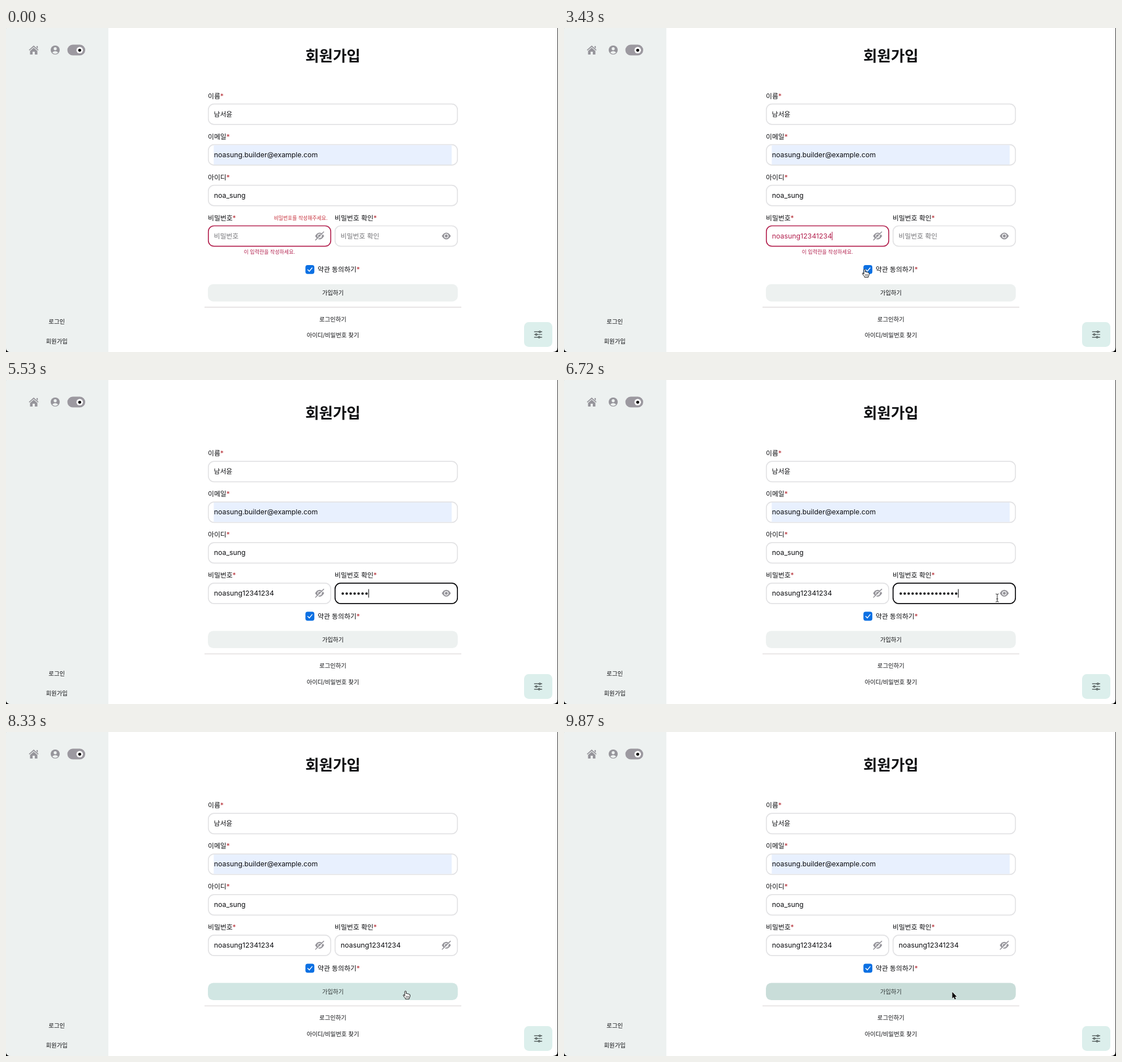
Animation of 976 by 574 pixels, one loop 9.94 s. Source, as an HTML page:

```html
<!DOCTYPE html>
<html lang="ko">
<head>
<meta charset="utf-8">
<title>회원가입</title>
<style>
  html, body { margin: 0; width: 100%; height: 100%; overflow: hidden; background: #000; }
  svg { display: block; width: 976px; height: 574px; font-family: Inter, "Noto Sans CJK KR", "Noto Sans CJK", "Noto Sans", sans-serif; }
  text { fill: #0c0d10; }
  .hint { fill: #757579; }
  .box { fill: #fff; stroke: #e2e2e4; stroke-width: 1.7; }
  .star { fill: #b3262e; }
  .mid { text-anchor: middle; }
  .end { text-anchor: end; }
  .bold { font-weight: 700; }
  .med { font-weight: 500; }
  .icon { fill: #96959b; }
</style>
</head>
<body>
<svg id="stage" viewBox="0 0 976 574"></svg>
<script>
const LOOP = 9940, STEP = 70;
const PASSWORD = 'noasung12341234';
const RED = '#b3224f', GREY = '#e2e2e4';
const LABEL = 11.85, VALUE = 12.3;

// Times at which each character lands in the two password fields.
const typedLeft = [910, 1050, 1260, 1540, 1610, 1750, 1820, 2170, 2310, 2450, 2730, 2800, 2870, 2940, 3080];
const typedRight = [4200, 4340, 4480, 5040, 5180, 5320, 5530, 5810, 5880, 5950, 6020, 6090, 6160, 6230, 6300];

const FOCUS_LEFT = 560, FOCUS_RIGHT = 3710, SETTLE = 3780, REVEAL = 6860;

// Pointer path: time, x, y, shape used from that time on.
const path = [
  [70, 966, 536, 'arrow'], [210, 800, 455, 'arrow'], [350, 545, 346, 'arrow'], [420, 506, 354, 'beam'],
  [560, 472, 366, 'beam'], [910, 472, 366, ''],
  [3220, 480, 378, 'beam'], [3290, 496, 402, 'arrow'], [3360, 522, 424, 'hand'], [3430, 531.5, 427.5, 'hand'],
  [3500, 548, 420, 'hand'], [3570, 580, 398, 'arrow'], [3640, 616, 374, 'beam'], [3710, 629, 367, 'beam'],
  [4200, 629, 367, ''],
  [6440, 629, 370, 'beam'], [6580, 690, 402, 'arrow'], [6720, 766, 386, 'beam'], [6790, 778, 375, 'hand'],
  [6930, 780, 374, 'hand'], [7070, 789, 378, 'hand'], [7210, 780, 362, 'hand'], [7560, 780, 362, 'hand'],
  [7630, 734.5, 410.5, 'arrow'], [7980, 722, 446, 'hand'], [8260, 708, 460, 'hand'], [8470, 703, 457, 'hand'],
  [8540, 702, 448, 'hand'], [8610, 702, 430, 'arrow'], [8680, 701, 416, 'arrow'], [8750, 699, 434, 'arrow'],
  [8820, 696, 445, 'hand'], [8890, 693, 450, 'hand'], [9240, 698, 464, 'hand'], [9450, 692, 470, 'hand'],
  [9540, 689, 468, 'arrow'], [9660, 687.5, 463, 'arrow'], [9870, 686.5, 460.5, 'arrow']
];

// Submit button tone: 0 idle, 1 hovered, 2 sent.
const tone = [[0, 0], [7950, 0], [8120, 1], [8560, 1], [8680, 0.4], [8800, 0.4], [8880, 1], [9540, 1], [9800, 2]];
const toneColors = [[237, 241, 240], [209, 230, 227], [201, 221, 217]];

const text = (x, cy, size, str, cls = '', id = '') =>
  `<text id="${id}" class="${cls}" x="${x}" y="${cy + size * 0.38}" font-size="${size}">${str}</text>`;
const label = (x, cy, str) => text(x, cy, LABEL, str + '<tspan class="star">*</tspan>');
const box = (x, y, w, id = '') =>
  `<rect id="${id}" class="box" x="${x}" y="${y}" width="${w}" height="36.2" rx="10"/>`;
const eye = (x, id, slash) => `<g id="${id}" class="icon" transform="translate(${x} 368.4)">
  <path d="M-8 0Q-4.5-6 0-6T8 0Q4.5 6 0 6T-8 0Z"/>
  <circle r="3.2" fill="none" stroke="#fff" stroke-width="1.3"/>
  ${slash ? '<path d="M-6.5 8.4 8.1-6.2" stroke="#fff" stroke-width="1.6"/><path d="M-7.2 7.2 7.2-7.2" stroke="#96959b" stroke-width="1.6" stroke-linecap="round"/>' : ''}</g>`;

document.getElementById('stage').innerHTML = `
  <path d="M0 1Q0 0 1 0H975.2V566Q975.2 574 967 574H8Q0 574 0 566Z" fill="#fff"/>
  <path d="M0 1Q0 0 1 0H181V574H8Q0 574 0 566Z" fill="#edf1f0"/>
  <path class="icon" fill-rule="evenodd" d="M49 31 57.6 38.8 56.5 40.1 49 33.4 41.5 40.1 40.4 38.8ZM54 32H56.2V36.6L54 34.6ZM49 35 55.5 40.8V47H51V42H47V47H42.5V40.8Z"/>
  <circle class="icon" cx="87" cy="39" r="8"/>
  <circle cx="87" cy="36.7" r="2.7" fill="#edf1f0"/>
  <path d="M81.8 43.3Q87 38.8 92.2 43.3Q90 46 87 46T81.8 43.3Z" fill="#edf1f0"/>
  <rect x="108.5" y="29.6" width="31.6" height="19" rx="9.5" fill="#9c99a0"/>
  <circle cx="130.3" cy="39.3" r="5.8" fill="#fff"/><circle cx="130.3" cy="39.3" r="2.6"/>
  ${text(89.7, 520.5, 10.4, '로그인', 'mid med')}
  ${text(89.7, 555, 10.4, '회원가입', 'mid med')}
  <rect x="916" y="521" width="50" height="44" rx="8.5" fill="#dcefec"/>
  <g stroke="#3c4544" stroke-width="1.2" fill="#dcefec">
    <path d="M933.8 538.2H948M933.8 543H948M933.8 547.8H948"/>
    <circle cx="943.8" cy="538.2" r="1.4"/><circle cx="937.6" cy="543" r="1.4"/><circle cx="942.6" cy="547.8" r="1.4"/>
  </g>
  <g id="upper">
    ${text(578, 49, 26.5, '회원가입', 'mid bold')}
    ${label(357, 120.5, '이름')}${box(357.8, 134.7, 440.4)}${text(367.5, 152, LABEL, '남서윤')}
    ${label(357, 192.5, '이메일')}${box(357.8, 206.7, 440.4)}
    <rect x="367.3" y="207.6" width="420.7" height="34.4" fill="#e8f0fe"/>
    ${text(367.8, 224.4, VALUE, 'noasung.builder@example.com')}
    ${label(357, 264.5, '아이디')}${box(357.8, 278.7, 440.4)}${text(367.8, 296.4, VALUE, 'noa_sung')}
    ${label(357, 336.5, '비밀번호')}${label(581, 336.5, '비밀번호 확인')}
    ${text(568.5, 336.7, 8.9, '', 'end', 'warn')}
    ${box(357.8, 350.5, 216.4, 'boxL')}${box(581.8, 350.5, 216.4, 'boxR')}
    ${text(367.5, 368, LABEL, '비밀번호', 'hint', 'hintL')}
    ${text(591.5, 368, LABEL, '비밀번호 확인', 'hint', 'hintR')}
    ${text(367.8, 368.2, VALUE, '', '', 'textL')}
    ${text(591.8, 368.2, VALUE, PASSWORD, '', 'textR')}
    <path id="dots" fill="none" stroke="#0c0d10" stroke-width="4.3" stroke-linecap="round"/>
    <path id="caret" d="M0 361V376" stroke-width="1.1"/>
    ${eye(554.5, 'eyeL', true)}${eye(778.5, 'eyeOpen', false)}${eye(778.5, 'eyeShut', true)}
  </g>
  ${text(465.8, 396.2, 9, '이 입력란을 작성하세요.', 'mid', 'required')}
  <g id="lower">
    <rect x="529.4" y="420" width="15.8" height="15.8" rx="4" fill="#0b70e3"/>
    <path d="M533.6 428.2 536.3 431 541.2 425" fill="none" stroke="#fff" stroke-width="1.5" stroke-linecap="round" stroke-linejoin="round"/>
    ${label(551, 427.6, '약관 동의하기')}
    <rect id="submit" x="357" y="453.8" width="441.8" height="30.6" rx="9.5"/>
    ${text(578, 469, 10.3, '가입하기', 'mid med', 'submitText')}
    <path d="M351 494.6H805" stroke="#e3dfe0" stroke-width="1.6"/>
    ${text(578, 515.6, 10.4, '로그인하기', 'mid')}
    ${text(578, 544, 10.4, '아이디/비밀번호 찾기', 'mid')}
  </g>
  <g id="pointer" stroke-linejoin="round" stroke-linecap="round">
    <path id="arrow" d="M0 0V11.4L2.6 9.1 4.4 13.2 6.4 12.3 4.7 8.4H8Z" stroke="#fff" stroke-width="1.1" paint-order="stroke"/>
    <g id="hand" fill="#fff" stroke="#111" stroke-width="1">
      <path d="M-1.3 8.2V1Q-1.2-.1 0-.1T1.3 1V4.6Q2.6 3.7 3.6 5Q5 4.2 5.8 5.6Q7.8 5.1 8 7V9.3Q7.8 11 6.6 12.4V14H-.2V12.7Q-2.2 10.9-3.9 7.9Q-4.2 6.5-2.9 6.4Z"/>
      <path d="M1.4 8.8V11.6M3.4 8.8V11.6M5.4 8.8V11.6" stroke-width=".7"/>
    </g>
    <path id="beam" d="M-2.3-7Q0-7 0-5.8Q0-7 2.3-7M0-5.8V5.8M-2.3 7Q0 7 0 5.8Q0 7 2.3 7M-1.2 1.8H1.2" fill="none" stroke="#222" stroke-width="1"/>
  </g>`;

const $ = id => document.getElementById(id);
const set = (id, attr, value) => $(id).setAttribute(attr, value);
const show = (id, on) => set(id, 'visibility', on ? 'visible' : 'hidden');
const paint = (id, prop, value) => { $(id).style[prop] = value; };
const mix = (a, b, k) => a + (b - a) * k;
const count = (times, t) => times.filter(at => t >= at).length;
const ramp = (t, from, ms) => Math.min(1, Math.max(0, (t - from) / ms));
const rgb = (a, b, k) => `rgb(${a.map((v, i) => Math.round(mix(v, b[i], k)))})`;

// Rows around t and the fraction between them.
function span(rows, t) {
  const i = rows.findLastIndex(row => t >= row[0]);
  const a = rows[Math.max(i, 0)], b = rows[Math.min(i + 1, rows.length - 1)];
  return { i, a, b, k: b[0] > a[0] ? ramp(t, a[0], b[0] - a[0]) : 0 };
}

function drawFields(t) {
  const nL = count(typedLeft, t), nR = count(typedRight, t);
  const settled = t >= SETTLE, revealed = t >= REVEAL;
  const onRight = t >= FOCUS_RIGHT && !revealed;
  const onLeft = t >= FOCUS_LEFT && t < FOCUS_RIGHT;

  set('upper', 'transform', `translate(0 ${settled ? 9.4 : 0})`);
  set('lower', 'transform', `translate(0 ${settled ? -9.4 : 0})`);
  show('required', !settled);
  paint('required', 'fill', RED);

  $('warn').textContent = nL === 0 ? '비밀번호를 작성해주세요.' : nL < 12 ? '12글자 이상으로 작성해주세요.' : '';
  paint('warn', 'fill', '#c62f3a');

  show('hintL', nL === 0);
  $('textL').textContent = PASSWORD.slice(0, nL);
  paint('textL', 'fill', settled ? '#0c0d10' : RED);
  paint('boxL', 'stroke', settled ? rgb([179, 34, 79], [226, 226, 228], ramp(t, SETTLE - 70, 210)) : RED);

  show('hintR', nR === 0);
  show('textR', revealed);
  show('dots', nR > 0 && !revealed);
  set('dots', 'd', Array.from({ length: nR }, (_, i) => `M${595.4 + 7 * i} 369h.01`).join('') || 'M0 0');
  const focus = revealed ? 1 - ramp(t, REVEAL - 70, 210) : ramp(t, FOCUS_RIGHT - 70, 140);
  paint('boxR', 'stroke', rgb([226, 226, 228], [5, 5, 8], focus));
  show('eyeOpen', !revealed);
  show('eyeShut', revealed);

  show('caret', onLeft || onRight);
  const x = onRight ? 592.2 + 7 * nR : 368 + (nL ? $('textL').getComputedTextLength() : 0);
  set('caret', 'transform', `translate(${x} 0)`);
  set('caret', 'stroke', onRight ? '#0c0d10' : RED);
}

function drawSubmit(t) {
  const { a, b, k } = span(tone, t);
  const level = mix(a[1], b[1], k), base = Math.min(1, Math.floor(level));
  set('submit', 'fill', rgb(toneColors[base], toneColors[base + 1], level - base));
  paint('submitText', 'fill', rgb([12, 13, 16], [46, 52, 52], Math.min(1, level)));
}

function drawPointer(t) {
  const { i, a, b, k } = span(path, t);
  const shape = i < 0 ? '' : a[3];
  for (const id of ['arrow', 'hand', 'beam']) show(id, id === shape);
  set('pointer', 'transform', `translate(${mix(a[1], b[1], k)} ${mix(a[2], b[2], k)})`);
}

let start = null;
function tick(now) {
  start ??= now;
  const t = Math.floor(((now - start) % LOOP) / STEP) * STEP;
  drawFields(t);
  drawSubmit(t);
  drawPointer(t);
  requestAnimationFrame(tick);
}
requestAnimationFrame(tick);
</script>
</body>
</html>
```
